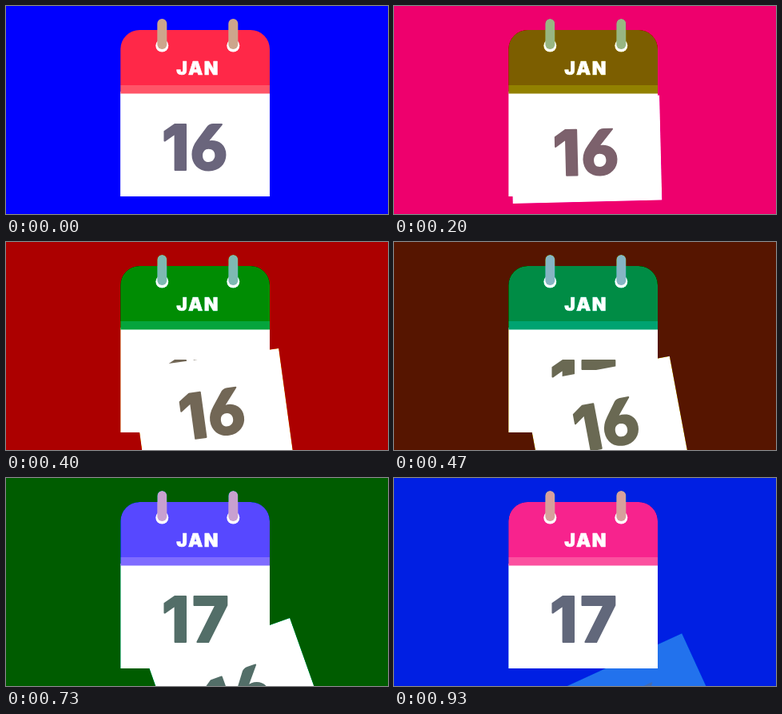
An HTML page with a canvas for the animation above (990 ms loop, 478x260 px).

```html
<!DOCTYPE html>
<html lang="en">
<head>
<meta charset="utf-8">
<title>Calendar page turn</title>
<style>
  html, body { margin: 0; width: 100%; height: 100%; overflow: hidden; }
  canvas { display: block; width: 478px; height: 260px; }
</style>
</head>
<body>
<canvas id="stage" width="478" height="260"></canvas>
<script>
const canvas = document.getElementById('stage');
const ctx = canvas.getContext('2d');

const LOOP = 990;
const STEPS = 15;
const PAGE = { x: 143.3, y: 107, w: 186.7, h: 131 };
const INK = '#6a657c';

// Fall progress at a few steps; linear in between.
const FALL = [[0, 0], [2, .012], [4, .1], [5, .2], [7, .426], [9, .575], [12, .885], [14, .985]];

function fallAt(step) {
  const i = FALL.findIndex(([s]) => s >= step);
  if (i === 0) return 0;
  const [s0, p0] = FALL[i - 1];
  const [s1, p1] = FALL[i];
  return p0 + (p1 - p0) * (step - s0) / (s1 - s0);
}

// Steps of 1/15 s, each start rounded to 10 ms.
function stepAt(ms) {
  let step = STEPS - 1;
  while (Math.round(step * 20 / 3) * 10 > ms) step--;
  return step;
}

function rect(color, x, y, w, h, radii = 0) {
  ctx.fillStyle = color;
  ctx.beginPath();
  ctx.roundRect(x, y, w, h, radii);
  ctx.fill();
}

// Text centred on its visible ink; the outline rounds its corners.
function label(text, centerX, baseline, font, color, outline) {
  ctx.font = font;
  ctx.fillStyle = ctx.strokeStyle = color;
  ctx.lineWidth = outline;
  ctx.lineJoin = 'round';
  const m = ctx.measureText(text);
  const x = centerX - (m.actualBoundingBoxRight - m.actualBoundingBoxLeft) / 2;
  ctx.fillText(text, x, baseline);
  ctx.strokeText(text, x, baseline);
}

function digit(text, centerX, font = '800 78px Inter, sans-serif') {
  label(text, centerX, 204.5, font, INK, 2);
}

function blankPage() {
  rect('#fff', PAGE.x, PAGE.y, PAGE.w, PAGE.h);
  digit('1', 211.5);
}

function nextPage() {
  blankPage();
  digit('7', 256);
}

function fallingPage(step) {
  const p = fallAt(step);
  const cx = PAGE.x + PAGE.w / 2;
  const cy = PAGE.y + PAGE.h / 2;
  ctx.save();
  ctx.globalAlpha = Math.min(1, .86 - .245 * (step - 12));
  ctx.translate(cx + 67 * p, cy + 122 * p);
  ctx.rotate(-25 * p * Math.PI / 180);
  ctx.translate(-cx, -cy);
  blankPage();
  digit('6', 254, '900 78px Lato, sans-serif');
  ctx.restore();
}

function pin(x) {
  ctx.fillStyle = '#fff';
  ctx.beginPath();
  ctx.arc(x, 49.5, 8, 0, Math.PI * 2);
  ctx.fill();
  rect('#cda58c', x - 6, 16, 12, 38, 6);
}

function header() {
  rect('#ff2848', PAGE.x, 30, PAGE.w, 69, [24, 24, 0, 0]);
  rect('#ff5568', PAGE.x, 99, PAGE.w, 10.5);
  ctx.letterSpacing = '1.5px';
  label('JAN', 239, 86, '900 23px Inter, sans-serif', '#fff', .6);
  ctx.letterSpacing = '0px';
  pin(195.3);
  pin(284.3);
}

function draw(step) {
  canvas.style.filter = `hue-rotate(${step * 360 / STEPS}deg)`;
  rect('#00f', 0, 0, 478, 260);
  nextPage();
  fallingPage(step);
  header();
}

function tick() {
  draw(stepAt(performance.now() % LOOP));
  requestAnimationFrame(tick);
}
tick();
</script>
</body>
</html>
```
